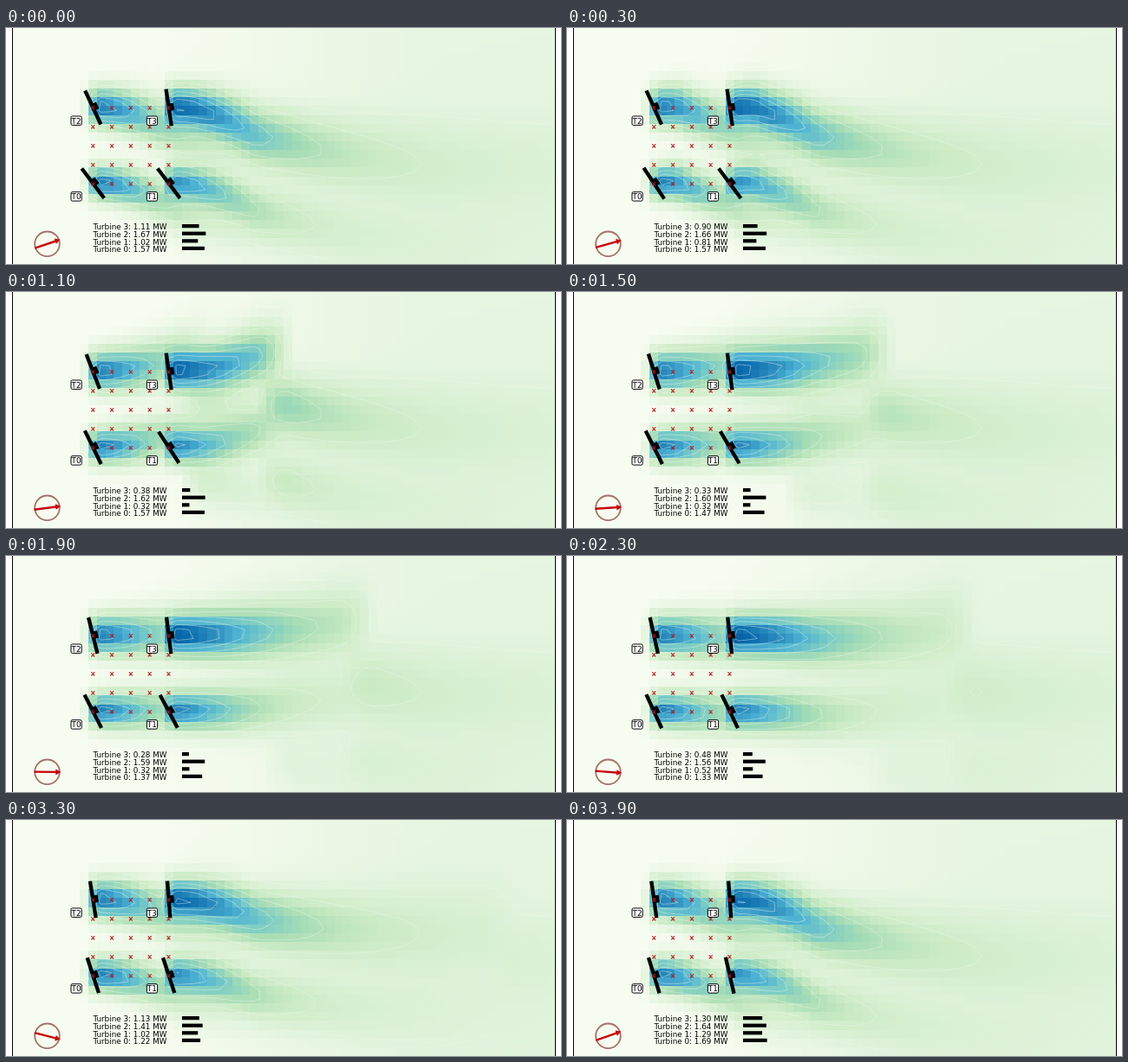
An HTML page with a canvas that plays this animation: 640x273 px, repeating every 4000 ms.

```html
<!DOCTYPE html>
<html lang="en">
<head>
<meta charset="utf-8">
<title>Wind farm wakes</title>
<style>
  html, body { margin: 0; width: 100%; height: 100%; overflow: hidden; background: #fff; }
  canvas, svg { position: absolute; left: 0; top: 0; width: 640px; height: 273px; display: block; }
  text { font: 8.8px "DejaVu Sans", sans-serif; fill: #000; white-space: pre; }
</style>
</head>
<body>
<canvas id="field" width="640" height="273"></canvas>
<svg id="farm" viewBox="0 0 640 273"></svg>
<script>
const STEP = 100, STEPS = 40;
const COLS = 64, ROWS = 27, LEFT = 7, TOP = -1, CW = 626 / COLS, CH = 10.15;
const DRIFT = 20; // pixels the air travels per step
const FRONT = 12; // pixels per step at which a new wake replaces the old one
const LEVELS = [0.125, 0.22, 0.34, 0.48, 0.6, 0.72, 0.84];
const GNBU = ['f7fcf0', 'e0f3db', 'ccebc5', 'a8ddb5', '7bccc4', '4eb3d3', '2b8cbe', '0868ac', '084081']
  .map(h => [0, 2, 4].map(i => parseInt(h.slice(i, i + 2), 16)));

// yaw in degrees and power in MW at the moments in KEYS
const KEYS = [0, 7, 11, 19, 27, 33, 38, 39];
const TURBINES = [
  { x: 100.3, y: 179.7, amp: 0.8, reach: 75, width: 13,
    yaw: [37, 29, 26, 27, 22, 18, 17, 17], mw: [1.57, 1.57, 1.57, 1.37, 1.28, 1.22, 1.16, 1.69] },
  { x: 187.7, y: 179.7, amp: 0.72, reach: 88, width: 14,
    yaw: [37, 36, 33, 28, 23.5, 18, 13.5, 13], mw: [1.02, 0.54, 0.32, 0.32, 0.72, 1.02, 1.25, 1.29] },
  { x: 100.3, y: 92, amp: 0.8, reach: 85, width: 15,
    yaw: [25, 23, 21, 14, 11, 9, 8, 8], mw: [1.67, 1.64, 1.62, 1.59, 1.53, 1.41, 1.3, 1.64] },
  { x: 187.7, y: 92, amp: 0.85, reach: 122, width: 16,
    yaw: [8.5, 8, 8, 7, 6, 4.5, 4, 4], mw: [1.11, 0.62, 0.38, 0.28, 0.69, 1.13, 1.27, 1.3] }
];

const clamp = v => Math.max(0, Math.min(1, v));
const smooth = v => { v = clamp(v); return v * v * (3 - 2 * v); };

function keyed(values, step) {
  let i = 0;
  while (i < KEYS.length - 2 && step >= KEYS[i + 1]) i++;
  const f = (step - KEYS[i]) / (KEYS[i + 1] - KEYS[i]);
  return values[i] + (values[i + 1] - values[i]) * f;
}

// The wind veers one degree per step; age counts steps since it last snapped back
const windAge = step => (step + 1) % STEPS;
const windAngle = age => Math.max(0, age) - 19.5;

// Sideways shift of the air that left a rotor k steps ago
function windPath(age) {
  const path = [0];
  for (let k = 0; k < 32; k++)
    path.push(path[k] + DRIFT * Math.tan(windAngle(age - k) * Math.PI / 180));
  return path;
}
const OLD_PATH = windPath(STEPS - 1);

// Wakes leave the rotor straight and gradually take up the wind's course
function shift(path, d) {
  const k = Math.floor(d / DRIFT), f = d / DRIFT - k;
  return (path[k] + (path[k + 1] - path[k]) * f) * clamp(d / 100);
}

function deficit(x, y, age, path) {
  let sum = 0;
  for (const t of TURBINES) {
    const d = x - t.x, far = Math.max(0, d);
    if (d < -13) continue;
    const s = t.width + 0.065 * far;
    const a = t.amp * clamp((d + 12) / 15) / (1 + (far / t.reach) ** 2);
    const plume = p => Math.exp(-(((y - t.y + 0.8 - shift(p, far)) / s) ** 2));
    const old = smooth((far - FRONT * age) / 45 + 1);
    sum += a * a * ((1 - old) * plume(path) + old * plume(OLD_PATH));
  }
  return 0.09 * smooth((x - 120) / 400) + Math.sqrt(sum);
}

function colour(v) {
  const p = clamp(v) * 8, i = Math.min(7, Math.floor(p)), f = p - i;
  return `rgb(${GNBU[i].map((c, n) => Math.round(c + (GNBU[i + 1][n] - c) * f))})`;
}

const ctx = document.getElementById('field').getContext('2d');
const midX = c => LEFT + (c + 0.5) * CW;
const midY = r => TOP + (r + 0.5) * CH;

function drawContours(grid) {
  ctx.beginPath();
  for (let r = 0; r < ROWS - 1; r++) for (let c = 0; c < COLS - 1; c++) {
    const corners = [[c, r], [c + 1, r], [c + 1, r + 1], [c, r + 1]];
    for (const level of LEVELS) {
      const hits = [];
      corners.forEach((p, i) => {
        const q = corners[(i + 1) % 4];
        const a = grid[p[1]][p[0]] - level, b = grid[q[1]][q[0]] - level;
        if (a < 0 === b < 0) return;
        const f = a / (a - b);
        hits.push([midX(p[0] + (q[0] - p[0]) * f), midY(p[1] + (q[1] - p[1]) * f)]);
      });
      for (let i = 0; i < hits.length; i += 2) {
        ctx.moveTo(...hits[i]);
        ctx.lineTo(...hits[i + 1]);
      }
    }
  }
  ctx.lineWidth = 0.9;
  ctx.strokeStyle = 'rgba(240,248,240,0.45)';
  ctx.stroke();
}

function drawField(age) {
  const path = windPath(age), grid = [];
  for (let r = 0; r < ROWS; r++) {
    grid.push([]);
    const y = Math.round(TOP + r * CH), h = Math.round(TOP + (r + 1) * CH) - y;
    for (let c = 0; c < COLS; c++) {
      const v = deficit(midX(c), midY(r), age, path);
      const x = Math.round(LEFT + c * CW), w = Math.round(LEFT + (c + 1) * CW) - x;
      grid[r].push(v);
      ctx.fillStyle = colour(v);
      ctx.fillRect(x, y, w, h);
    }
  }
  drawContours(grid);
}

const farm = document.getElementById('farm');
function add(tag, attrs, parent = farm) {
  const el = document.createElementNS('http://www.w3.org/2000/svg', tag);
  for (const k in attrs) el.setAttribute(k, attrs[k]);
  return parent.appendChild(el);
}

for (const x of [7.5, 633.5]) add('path', { d: `M${x} 0V273`, stroke: '#000' });

for (const t of TURBINES) {
  t.rotor = add('g', {});
  add('path', { d: 'M0 -21.5V21.5', stroke: '#000', 'stroke-width': 4.3 }, t.rotor);
  add('rect', { x: 0, y: -4.5, width: 6, height: 8.5 }, t.rotor);
}

let marks = '';
for (let r = 0; r < 5; r++) for (let c = 0; c < 5; c++)
  marks += `M${98.3 + c * 21.8} ${90.4 + r * 22}l4 4m0 -4l-4 4`;
add('path', { d: marks, stroke: '#b01c1c', 'stroke-width': 1.1, fill: 'none' });

TURBINES.forEach((t, i) => {
  const x = t.x - 19.2, y = t.y + 15.2;
  add('rect', { x: x - 6.1, y: y - 5.2, width: 12.2, height: 10.4, rx: 1.5, fill: '#fff', stroke: '#000' });
  add('text', { x, y: y + 3.4, 'text-anchor': 'middle' }).textContent = 'T' + i;
  const row = 3 - i;
  t.label = add('text', { x: 100.4, y: 233.3 + row * 8.7 });
  t.bar = add('rect', { x: 203, y: 227 + row * 8.6, height: 4.2 });
});

add('circle', { cx: 47.5, cy: 249.8, r: 14.3, fill: 'none', stroke: '#a5706a', 'stroke-width': 1.8 });
const arrow = add('g', {});
add('path', { d: 'M-15 0H12', stroke: '#c8000c', 'stroke-width': 2.4 }, arrow);
add('path', { d: 'M9.8 -3.3L15.8 0L9.8 3.3Z', fill: '#c8000c' }, arrow);

function draw(step) {
  const age = windAge(step);
  drawField(age);
  TURBINES.forEach((t, i) => {
    const mw = keyed(t.mw, step);
    t.rotor.setAttribute('transform', `translate(${t.x} ${t.y}) rotate(${-keyed(t.yaw, step)})`);
    t.label.textContent = `Turbine ${i}: ${mw.toFixed(2)} MW`;
    t.bar.setAttribute('width', 4 + 14 * mw);
  });
  arrow.setAttribute('transform', `translate(47.5 249.8) rotate(${windAngle(age)})`);
}

let shown = -1;
const start = performance.now();
function tick() {
  const step = Math.floor((performance.now() - start) / STEP) % STEPS;
  if (step !== shown) draw(shown = step);
  requestAnimationFrame(tick);
}
tick();
</script>
</body>
</html>
```
